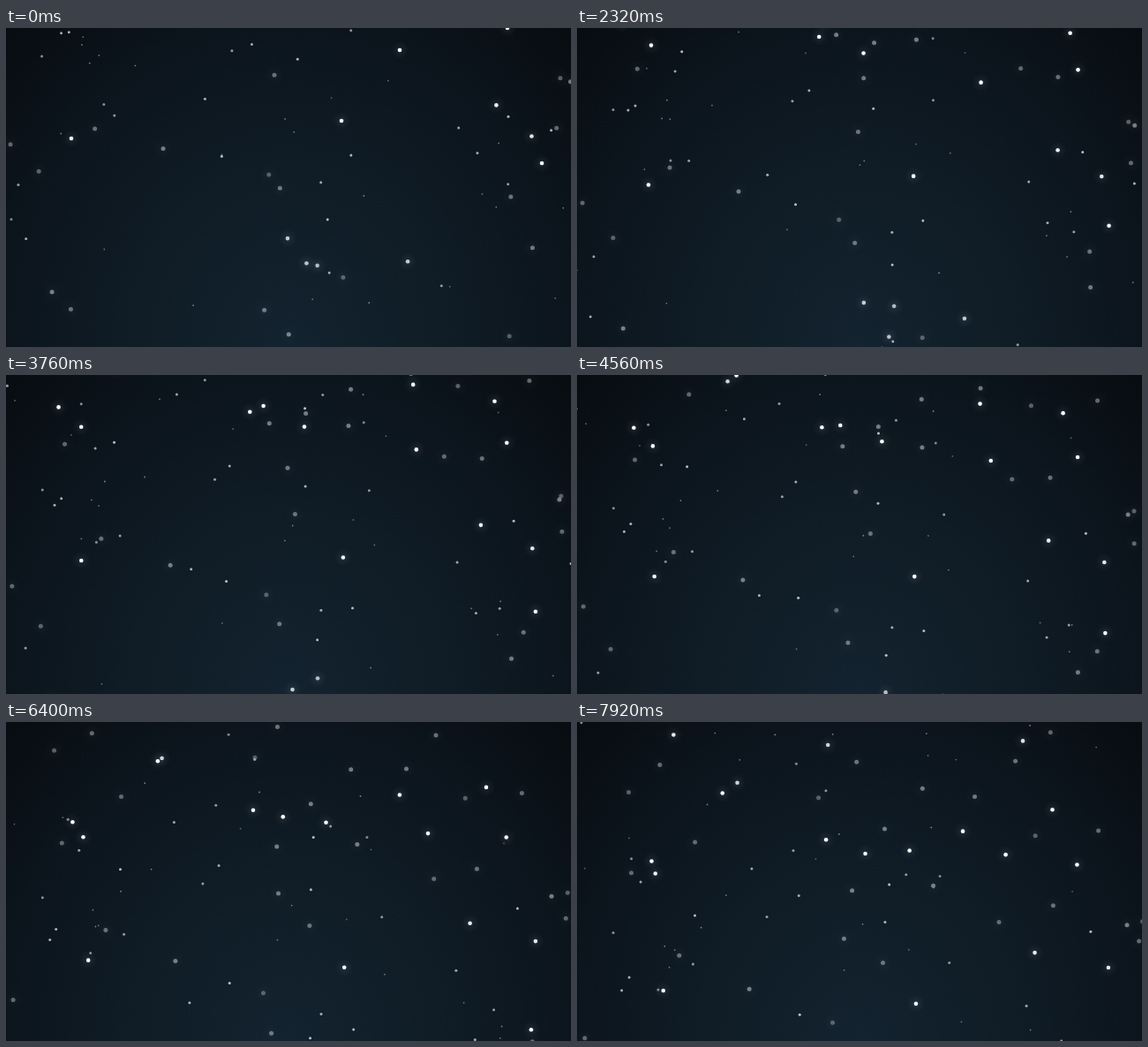
Animation of 640x361 px, one loop 8 s. Source, as an HTML page with a canvas:

```html
<!DOCTYPE html>
<html lang="en">
<head>
<meta charset="utf-8">
<title>Falling stars</title>
<style>
  html, body { margin: 0; width: 100%; height: 100%; overflow: hidden; background: #080c11; }
  canvas { display: block; width: 640px; height: 361px; }
</style>
</head>
<body>
<canvas id="sky" width="640" height="361"></canvas>
<script>
const W = 640, H = 361, LOOP = 8000, STEP = 80;
const ctx = document.getElementById("sky").getContext("2d");

const LOOKS = {
  bright: { r: 2.3, alpha: 1, glow: 0.1 },
  soft: { r: 2.5, alpha: 0.45, glow: 0.03 },
  small: { r: 1.5, alpha: 0.75, glow: 0 },
  dust: { r: 0.9, alpha: 0.5, glow: 0 }
};

// The leading stars: x, y, px/s across, px/s down.
const LEADERS = [
  [74, 125, 3, 22.6], [607, 153, -1.9, 30.5], [380, 105, 0.5, 27],
  [446, 25, 5, 15.8], [568, 0, -0.2, 20.4], [303, -20, 9.3, 20.9],
  [271, -41, 1.4, 22], [37, -73, 6, 29.1], [202, -108, -4.7, 23.8],
  [260, -68, 8.4, 27.4], [483, -91, -5.8, 27.1], [567, -33, -3.6, 16.7]
];

function seeded(seed) {
  return () => {
    seed = (seed * 1664525 + 1013904223) % 4294967296;
    return seed / 4294967296;
  };
}

function pickLook(u) {
  if (u < 0.09) return LOOKS.bright;
  if (u < 0.4) return LOOKS.soft;
  return u < 0.75 ? LOOKS.small : LOOKS.dust;
}

// Stars start far enough above the stage to keep it filled; some turn back sideways.
function makeField(count) {
  const rnd = seeded(4127);
  return Array.from({ length: count }, () => {
    const vy = 14 + 24 * rnd();
    const top = -vy * LOOP / 1000;
    const look = pickLook(rnd());
    return {
      x: W * rnd(), y: top + (H - top) * rnd(),
      vx: 14 * rnd() - 7, vy, turn: 16 * rnd(),
      ...look, alpha: look.alpha * (0.65 + 0.35 * rnd())
    };
  });
}

const stars = [
  ...makeField(122),
  ...LEADERS.map(([x, y, vx, vy]) => ({ x, y, vx, vy, turn: Infinity, ...LOOKS.bright }))
];

const sky = ctx.createRadialGradient(0, 0, 0, 0, 0, 1);
[[0, "#13232f"], [0.35, "#101d27"], [0.7, "#0c151d"], [1, "#080c11"]]
  .forEach(([at, color]) => sky.addColorStop(at, color));

// Ellipse from the bottom centre out to the top corners.
function drawSky() {
  ctx.save();
  ctx.translate(W / 2, H);
  ctx.scale(W / 2 * Math.SQRT2, H * Math.SQRT2);
  ctx.fillStyle = sky;
  ctx.fillRect(-1, -1, 2, 2);
  ctx.restore();
}

function disc(x, y, r) {
  ctx.beginPath();
  ctx.arc(x, y, r, 0, Math.PI * 2);
  ctx.fill();
}

function drawGlow(x, y, r, alpha) {
  const halo = ctx.createRadialGradient(x, y, 0, x, y, r);
  halo.addColorStop(0, `rgba(220,235,245,${alpha})`);
  halo.addColorStop(0.5, `rgba(220,235,245,${alpha * 0.35})`);
  halo.addColorStop(1, "rgba(220,235,245,0)");
  ctx.fillStyle = halo;
  disc(x, y, r);
}

function drawStar({ x, y, vx, vy, turn, r, alpha, glow }, s) {
  const px = x + vx * (s < turn ? s : 2 * turn - s);
  const py = y + vy * s;
  if (py < -12 || py > H + 12) return;
  if (glow) drawGlow(px, py, r * 4.5, glow);
  ctx.fillStyle = `rgba(250,252,252,${alpha})`;
  disc(px, py, r);
}

function render(ms) {
  const held = ms < 2 * STEP ? 0 : Math.floor(ms / STEP) * STEP;
  drawSky();
  stars.forEach(star => drawStar(star, held / 1000));
}

const start = performance.now();
function tick() {
  render((performance.now() - start) % LOOP);
  requestAnimationFrame(tick);
}
tick();
</script>
</body>
</html>
```
